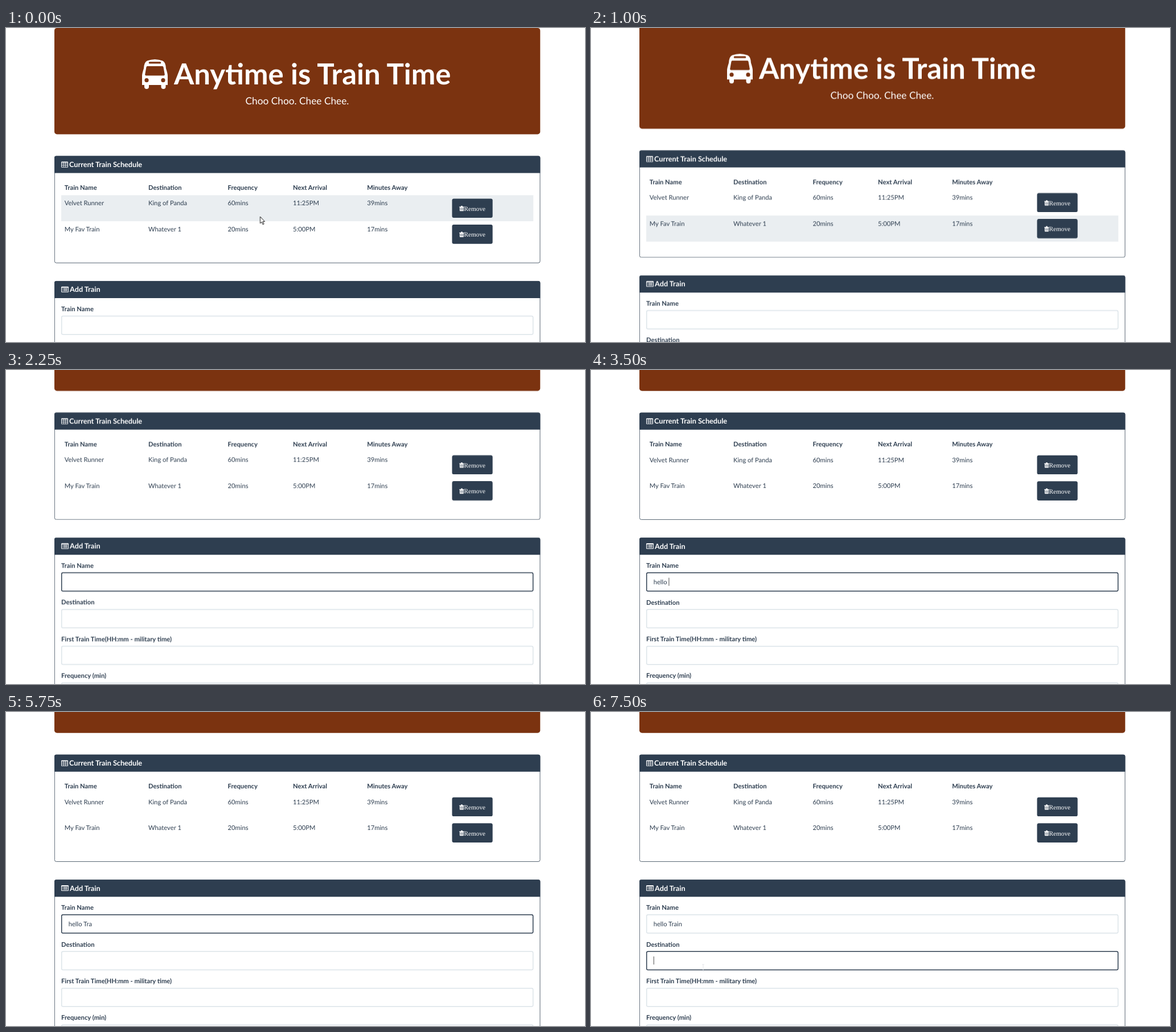
Recreate the animation shown at these times as an HTML page. Size 1017x551 px, loop 8000 ms.

```html
<!DOCTYPE html>
<html lang="en">
<head>
<meta charset="utf-8">
<title>Train schedule</title>
<style>
  :root { --navy: #2e3e50; --brown: #7b3310; --line: #dce4e9; --hover: #eaeef1; }
  html, body { margin: 0; width: 100%; height: 100%; overflow: hidden; background: #fff; }
  svg { display: block; width: 1017px; height: 551px; }
  text { font: 11.23px Lato, sans-serif; fill: var(--navy); white-space: pre; text-rendering: geometricPrecision; }
  .bold { font-weight: 700; }
  .title { font-size: 12.7px; font-weight: 700; fill: #fff; }
  .hero { font-size: 50.9px; font-weight: 700; fill: #fff; text-anchor: middle; }
  .lead { font-size: 17.3px; fill: #fff; text-anchor: middle; }
  .btn { font-family: "Liberation Serif", "Times New Roman", serif; fill: #fff; }
  .navy { fill: var(--navy); }
  .white { fill: #fff; }
  .panel { fill: #fff; stroke: var(--navy); stroke-width: .8; }
  .field { fill: #fff; stroke: var(--line); stroke-width: 1.5; }
  .caret { stroke: #222; stroke-width: .8; visibility: hidden; }
  .row { fill: var(--hover); }
  .arrow { fill: #fff; stroke: #000; stroke-width: .9; stroke-linejoin: round; }
  .beam { fill: none; stroke: #e1e5e8; stroke-width: .9; }

  #page, .row, .focus, .arrow, .beam { animation: 8s step-end infinite; }
  #page { animation-name: scroll; }
  #row0 { animation-name: hover0; }
  #row1 { animation-name: hover1; }
  #field0 { animation-name: focus0; }
  #field1 { animation-name: focus1; }
  .arrow { animation-name: arrow; }
  .beam { animation-name: beam; }

  @keyframes scroll {
    0% { transform: none; }
    12.5% { transform: translateY(-9.73px); }
    15.625%, 100% { transform: translateY(-149.76px); }
  }
  @keyframes hover0 {
    0% { opacity: 1; }
    3.125%, 100% { opacity: 0; }
  }
  @keyframes hover1 {
    0% { opacity: 0; }
    3.125% { opacity: 1; }
    15.625%, 100% { opacity: 0; }
  }
  @keyframes focus0 {
    0% { stroke: var(--line); }
    18.75% { stroke: var(--navy); }
    87.5%, 100% { stroke: var(--line); }
  }
  @keyframes focus1 {
    0% { stroke: var(--line); }
    87.5%, 100% { stroke: var(--navy); }
  }
  @keyframes arrow {
    0% { opacity: 1; transform: translate(446.5px, 331px); }
    3.125% { opacity: 1; transform: translate(394px, 342px); }
    6.25% { opacity: 1; transform: translate(334px, 349px); }
    9.375% { opacity: 0; }
    81.25% { opacity: 1; transform: translate(170px, 403px); }
    84.375%, 100% { opacity: 0; }
  }
  @keyframes beam {
    0% { opacity: 0; }
    9.375% { opacity: 1; transform: translate(281px, 352px); }
    12.5% { opacity: 0; }
    15.625% { opacity: 1; transform: translate(240.5px, 371px); }
    28.125% { opacity: 0; }
    84.375% { opacity: 1; transform: translate(190px, 437px); }
    87.5%, 100% { opacity: 1; transform: translate(197px, 449px); }
  }
</style>
</head>
<body>
<svg viewBox="0 0 1017 551">
  <g id="page">
    <rect x="85" y="0" width="853.3" height="186.4" rx="4.5" fill="var(--brown)"/>
    <path class="white" fill-rule="evenodd" d="M242 71Q242.500 60 248 57.600Q261.500 52.600 275 57.600Q280.500 60 281 71Q284 80 284 84V100H280.500V103q0 4-4 4t-4-4V100H251v3q0 4-4 4t-4-4V100H239V84Q239 80 242 71Z
      M252.300 59.300a1.600 1.600 0 0 0 0 3.200h18.400a1.600 1.600 0 0 0 0-3.200Z
      M248.300 67Q246.800 67 246.500 68.500L244.200 81.500Q244 83.500 246 83.500H277Q279 83.500 278.800 81.500L276.500 68.500Q276.200 67 274.700 67Z
      M243.400 91.700a3.600 3.600 0 1 0 7.200 0a3.600 3.600 0 1 0-7.200 0Z
      M272.400 91.700a3.600 3.600 0 1 0 7.200 0a3.600 3.600 0 1 0-7.200 0Z"/>
    <text class="hero" x="538.3" y="99">Anytime is Train Time</text>
    <text class="lead" x="511.5" y="134">Choo Choo. Chee Chee.</text>
    <g id="schedule"></g>
    <g id="form"></g>
    <text id="typed" x="109.7" y="525.4"></text>
    <path id="caret0" class="caret" d="M0 514.300v14.200"/>
    <path id="caret1" class="caret" d="M110.300 578.700v14.200"/>
  </g>
  <path class="arrow" d="M0 0V11.800L2.700 9.400L4.700 13.800L6.500 13L4.600 8.700H8Z"/>
  <path class="beam" d="M-2-6H2M0-6V6M-2 6H2"/>
</svg>
<script>
  const $ = id => document.getElementById(id);
  const text = (x, y, str, cls = '') => `<text class="${cls}" x="${x}" y="${y}">${str}</text>`;
  const rect = (x, y, w, h, cls, rx = 0, extra = '') =>
    `<rect x="${x}" y="${y}" width="${w}" height="${h}" class="${cls}" rx="${rx}" ${extra}/>`;

  const panel = (y, h, title, x) =>
    rect(85.4, y + .4, 852.6, h - .8, 'panel', 3) +
    `<path class="navy" d="M85 ${y + 30}v-27q0-3 3-3h847.300q3 0 3 3v27z"/>` +
    text(x, y + 19.3, title, 'title');

  // Three by three grid
  const tableIcon = (x, y) => {
    let out = rect(x, y, 12, 10.4, 'white', 1);
    for (let i = 0; i < 9; i++)
      out += rect(x + .9 + (i % 3) * 3.6, y + 2 + Math.floor(i / 3) * 2.75, 2.9, 2, 'navy');
    return out;
  };

  const listIcon = (x, y) => {
    let out = rect(x, y, 13, 10, 'white', 1.2) + rect(x + 1, y + 2.1, 11, 6.9, 'navy', .4);
    for (let i = 0; i < 3; i++) {
      const top = y + 3 + i * 1.9;
      out += rect(x + 1.9, top, 1, 1, 'white') + rect(x + 3.8, top, 7.2, 1, 'white');
    }
    return out;
  };

  const removeButton = y =>
    rect(783.5, y, 71.2, 33.6, 'navy', 3) +
    `<path class="white" d="M796 ${y + 14}h2.700l.6-1.500h2.300l.6 1.500h2.600v1h-.9v6q0 .9-.9.9h-5.200q-.9 0-.9-.9v-6h-.9z"/>` +
    [798.3, 800.1, 801.9].map(x => rect(x, y + 16, .7, 4.4, 'navy')).join('') +
    text(804.6, y + 21.2, 'Remove', 'btn');

  const columns = [102.8, 250, 389.6, 504, 634.2];
  const line = (cells, y, cls) => cells.map((c, i) => text(columns[i], y, c, cls)).join('');
  const trains = [
    ['Velvet Runner', 'King of Panda', '60mins', '11:25PM', '39mins'],
    ['My Fav Train', 'Whatever 1', '20mins', '5:00PM', '17mins']
  ];
  $('schedule').innerHTML =
    panel(224.6, 188, 'Current Train Schedule', 111) + tableIcon(97, 234.4) +
    line(['Train Name', 'Destination', 'Frequency', 'Next Arrival', 'Minutes Away'], 283.7, 'bold') +
    trains.map((cells, i) => {
      const y = 293.4 + i * 45.7;
      return rect(97, y, 829.3, 45.7, 'row', 0, `id="row${i}"`) + line(cells, y + 18) + removeButton(y + 6);
    }).join('');

  const labels = ['Train Name', 'Destination', 'First Train Time(HH:mm - military time)', 'Frequency (min)'];
  $('form').innerHTML =
    panel(444, 400, 'Add Train', 112) + listIcon(97, 453.7) +
    labels.map((label, i) => {
      const y = 497 + i * 64.4;
      return text(97, y, label, 'bold') + rect(97.7, y + 8.6, 828, 32.2, 'field focus', 2.3, `id="field${i}"`);
    }).join('');

  // [start in ms, text, field holding the visible caret]
  const typing = [
    [0, ''], [1500, '', 0], [2000, ''], [2250, 'h', 0], [2500, 'hel', 0], [2750, 'hell', 0],
    [3000, 'hello', 0], [3250, 'hello ', 0], [3500, 'hello R', 0], [4250, 'hello ', 0],
    [4500, 'hello T', 0], [4750, 'hello Tr', 0], [5000, 'hello Tra', 0], [5500, 'hello Tra'],
    [5750, 'hello Trai', 0], [6000, 'hello Train', 0], [6500, 'hello Train'],
    [7000, 'hello Train', 1], [7500, 'hello Train']
  ];
  const clock = $('page').getAnimations()[0];
  let shown;

  function draw() {
    const t = (clock.currentTime || 0) % 8000;
    const step = typing.findLast(s => s[0] <= t);
    if (step !== shown) {
      shown = step;
      const [, str, field] = step;
      $('typed').textContent = str;
      const end = str ? $('typed').getComputedTextLength() : 0;
      $('caret0').setAttribute('transform', `translate(${110.2 + end})`);
      [0, 1].forEach(i => $('caret' + i).style.visibility = field === i ? 'visible' : 'hidden');
    }
    requestAnimationFrame(draw);
  }
  draw();
</script>
</body>
</html>
```
